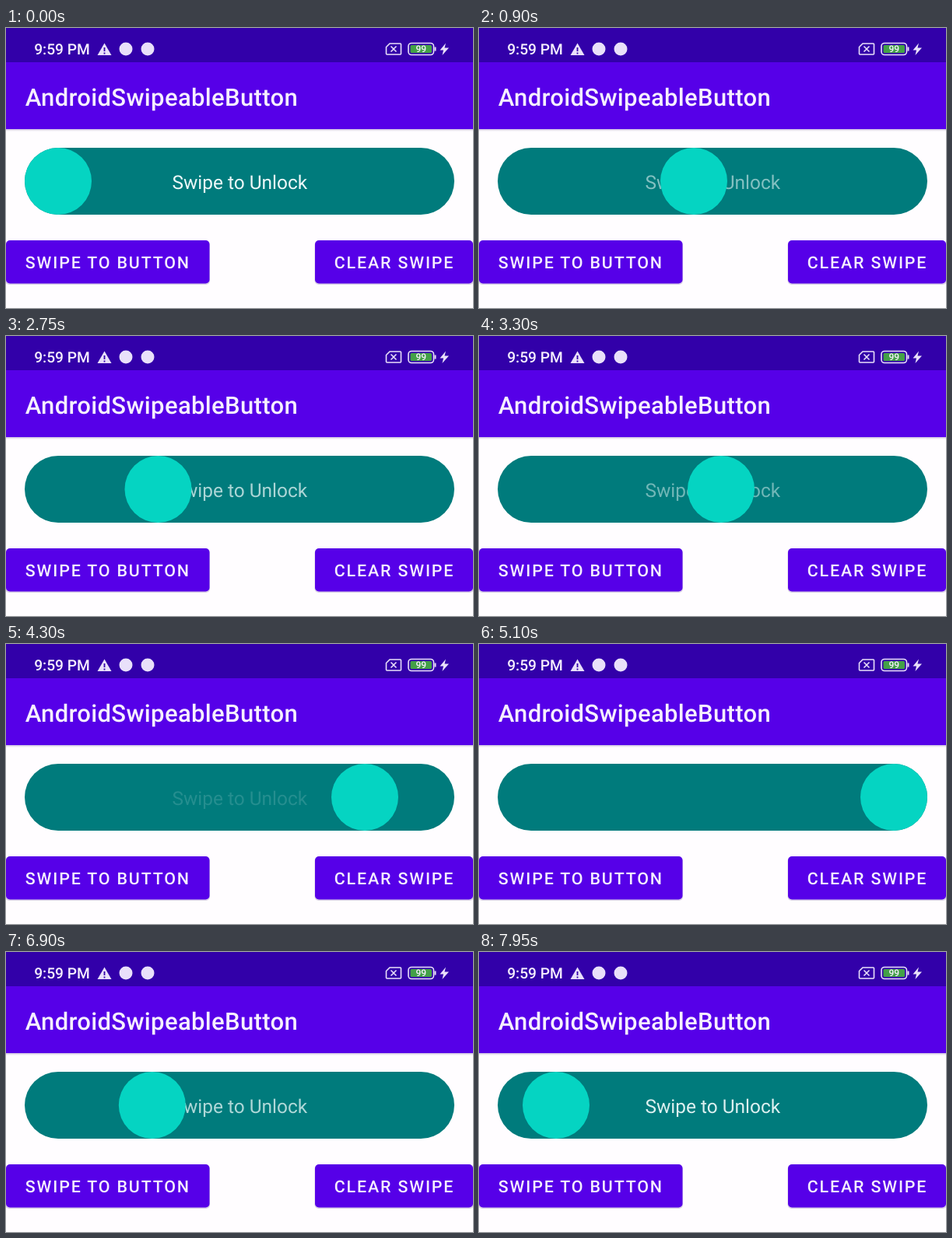
Write an HTML page that moves like this. It is 600x360 px and loops after 8 s.

```html
<!DOCTYPE html>
<html lang="en">
<head>
<meta charset="utf-8">
<title>Swipeable button</title>
<style>
  html, body { margin: 0; width: 100%; height: 100%; overflow: hidden; background: #fffdff; }
  svg { display: block; width: 600px; height: 360px; font-family: Roboto, sans-serif; text-rendering: geometricPrecision; }
  .soft { filter: blur(.5px); }
  .medium { font-weight: 500; fill: #f6effe; }
  .button { font-size: 21.4px; letter-spacing: 1.85px; }
  .line { fill: none; stroke: #e9e0fa; stroke-width: 1.6; }
</style>
</head>
<body>
<svg viewBox="0 0 600 360">
  <defs>
    <linearGradient id="shade" x2="0" y2="1">
      <stop stop-color="#cfc4df"/>
      <stop offset="1" stop-color="#fffdff"/>
    </linearGradient>
  </defs>

  <g class="soft">
    <!-- App bar and status bar -->
    <rect y="130" width="600" height="3" fill="url(#shade)"/>
    <rect width="600" height="130" fill="#5600e8"/>
    <rect width="600" height="44" fill="#3200a9"/>
    <text class="medium" x="36.200" y="34" font-size="19.2">9:59 PM</text>
    <g fill="#e9e0fa">
      <path d="M126.500 19.500L135.500 35H117.500Z"/>
      <path d="M126.500 25v5m0 1.500v2" stroke="#3200a9" stroke-width="1.800"/>
      <circle cx="154" cy="27" r="8.500"/>
      <circle cx="182" cy="27" r="8.500"/>
      <path d="M565 19.500L557.500 28.500H562L560.500 35L569 25.500H563.500Z"/>
      <rect x="550.500" y="24.500" width="2" height="5"/>
    </g>
    <path class="line" d="M493 20h13.500q1 0 1 1v12q0 1 -1 1h-17q-1 0 -1 -1v-8.500Z"/>
    <path class="line" d="M494.500 23.500l7 7m0-7l-7 7"/>
    <rect class="line" x="517" y="19.500" width="32.500" height="15" rx="4"/>
    <rect x="519.500" y="22" width="27.500" height="10" rx="1.500" fill="#43a047"/>
    <text class="medium" x="533.200" y="31.300" font-size="12" text-anchor="middle">99</text>
    <text class="medium" x="24.800" y="99.700" font-size="31" letter-spacing=".35">AndroidSwipeableButton</text>

    <!-- Swipe track -->
    <rect x="24" y="154" width="552" height="86" rx="43" fill="#007b7c"/>
    <text id="label" x="300.300" y="207" font-size="24.450" text-anchor="middle" fill="#eef9f9">Swipe to Unlock</text>

    <!-- Buttons -->
    <g fill="#d9d0e6">
      <rect x="-1" y="274" width="263" height="56" rx="5"/>
      <rect x="396.500" y="274" width="204.500" height="56" rx="5"/>
    </g>
    <g fill="#5600e8">
      <rect y="273" width="261.500" height="55.500" rx="5"/>
      <rect x="397" y="273" width="203" height="55.500" rx="5"/>
    </g>
    <text class="medium button" x="24.800" y="309">SWIPE TO BUTTON</text>
    <text class="medium button" x="421.800" y="309">CLEAR SWIPE</text>
  </g>
  <circle id="knob" cy="197" r="43" fill="#05d4c2"/>
</svg>
<script>
const DURATION = 8000, STEP = 50, START = 67, END = 533;
const knob = document.getElementById('knob');
const label = document.getElementById('label');

// Drag path of the knob: [time in ms, centre x]
const path = [
  [0, START], [150, START], [900, 276], [1100, 295], [1850, 133], [2150, 115],
  [3300, 311], [4300, 461], [4750, END], [6700, END], [7000, START],
  [7700, START], [7950, 99], [8000, 106]
];

// Tangent that is flat at turning points, so the path never overshoots
function slope(i) {
  if (i === 0 || i === path.length - 1) return 0;
  const [t0, x0] = path[i - 1], [t1, x1] = path[i], [t2, x2] = path[i + 1];
  const before = (x1 - x0) / (t1 - t0), after = (x2 - x1) / (t2 - t1);
  return before * after <= 0 ? 0 : 2 * before * after / (before + after);
}

function knobX(time) {
  const i = path.findIndex(([t]) => t > time) - 1;
  const [t0, x0] = path[i], [t1, x1] = path[i + 1];
  const span = t1 - t0, u = (time - t0) / span, v = 1 - u;
  return v * v * ((1 + 2 * u) * x0 + u * span * slope(i))
       + u * u * ((3 - 2 * u) * x1 - v * span * slope(i + 1));
}

function draw(now) {
  const time = Math.floor(now % DURATION / STEP) * STEP;
  const x = knobX(time);
  knob.setAttribute('cx', x);
  label.setAttribute('opacity', 1 - (x - START) / (END - START));
}

const origin = performance.now();
function tick() {
  draw(performance.now() - origin);
  requestAnimationFrame(tick);
}
tick();
</script>
</body>
</html>
```
